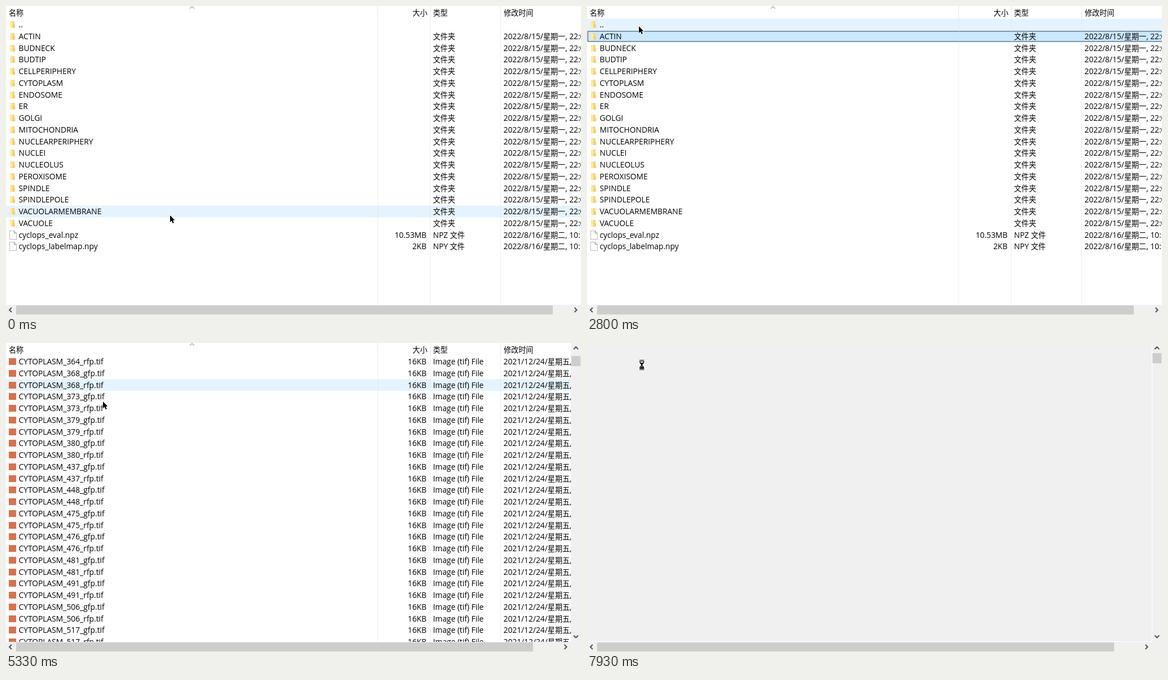
Recreate the animation shown at these times as an HTML page with a canvas. Size 1020 px wide and 549 px high, loop 8 s.

```html
<!DOCTYPE html>
<html lang="zh">
<head>
<meta charset="utf-8">
<title>File list</title>
<style>
html, body { margin: 0; width: 100%; height: 100%; overflow: hidden; background: #fff; }
canvas { display: block; width: 1020px; height: 549px; }
</style>
</head>
<body>
<canvas id="stage"></canvas>
<script>
const W = 1020, H = 549, LOOP = 8000, FPS = 15;
const TOP = 22.75, ROW = 20.75, BOTTOM = 531, LIST_RIGHT = 1002;
const LATIN = '13.8px "Open Sans", "Noto Sans", sans-serif';
const CJK = '13.1px "Noto Sans CJK SC", "Noto Sans CJK", sans-serif';

const canvas = document.getElementById('stage');
const ctx = canvas.getContext('2d');
const dpr = window.devicePixelRatio || 1;
canvas.width = W * dpr;
canvas.height = H * dpr;

// Folder contents
const up = { icon: folderIcon, name: '..' };
const folders = ('ACTIN BUDNECK BUDTIP CELLPERIPHERY CYTOPLASM ENDOSOME ER GOLGI MITOCHONDRIA ' +
  'NUCLEARPERIPHERY NUCLEI NUCLEOLUS PEROXISOME SPINDLE SPINDLEPOLE VACUOLARMEMBRANE VACUOLE')
  .split(' ')
  .map(name => ({ icon: folderIcon, name, type: '文件夹', date: '2022/8/15/星期一, 22:07' }));

function dataFile(name, size, type) {
  return { icon: pageIcon, name, size, type, date: '2022/8/16/星期二, 10:13' };
}

function images(name, ids) {
  return [up, ...ids.flatMap(id => ['gfp', 'rfp'].map(dye => ({
    icon: imageIcon, name: `${name}_${id}_${dye}.tif`, size: '16KB',
    type: 'Image (tif) File', date: '2021/12/24/星期五, 11:20'
  })))];
}

const root = [
  up, ...folders,
  dataFile('cyclops_eval.npz', '10.53MB', 'NPZ 文件'),
  dataFile('cyclops_labelmap.npy', '2KB', 'NPY 文件')
];
const actin = images('ACTIN', '70 122 137 173 196 201 205 259 278 290 414 422'.split(' '));
const cytoplasm = images('CYTOPLASM', [
  ...'39 42 50 81 93 96 99 100 110 124 161 162'.split(' '),
  ...Array.from({ length: 11 }, (_, i) => 178 + 17 * i),
  ...'364 368 373 379 380 437 448 475 476 481 491 506 517'.split(' ')
]);

// What is open, selected or loading, each from a given tick on.
const scenes = [
  { from: 0, list: root },
  { from: 23, list: root, select: 'ACTIN' },
  { from: 25, list: actin },
  { from: 37, list: actin, select: '..' },
  { from: 41, list: root, select: 'ACTIN' },
  { from: 53, list: root, select: 'CYTOPLASM' },
  { from: 56, list: root, select: 'CYTOPLASM', busy: true },
  { from: 61, busy: true },
  { from: 63, list: cytoplasm },
  { from: 98, list: cytoplasm, select: '..' },
  { from: 100, list: root, select: 'CYTOPLASM' },
  { from: 113, list: root, select: 'SPINDLEPOLE', busy: true },
  { from: 119, busy: true }
];

// Pointer moves: first tick, last tick, destination.
const origin = [291, 372];
const moves = [
  [1, 6, 240, 530], [6, 11, 232, 468], [13, 23, 76, 58],
  [24, 30, 88, 103], [30, 34, 92, 36], [44, 53, 100, 134],
  [55, 59, 126, 199], [61, 68, 146, 302], [71, 75, 160, 6],
  [77, 83, 183, 203], [88, 92, 120, 5], [94, 98, 90, 36],
  [100, 106, 86, 338], [112, 119, 97, 39]
];

function ease(tick, from, to) {
  const k = Math.min(1, Math.max(0, (tick - from) / (to - from)));
  return (1 - Math.cos(Math.PI * k)) / 2;
}

function pointer(tick) {
  let [x, y] = origin;
  for (const [from, to, tx, ty] of moves) {
    const k = ease(tick, from, to);
    x += (tx - x) * k;
    y += (ty - y) * k;
  }
  return [x, y];
}

// The wheel turns three rows per notch, sixteen notches down and back up.
function scrolled(tick) {
  return 3 * Math.round(16 * (ease(tick, 63, 68) - ease(tick, 79, 88)));
}

// Drawing helpers
function rect(color, x, y, w, h) {
  ctx.fillStyle = color;
  ctx.fillRect(x, y, w, h);
}

function line(points, color, width = 1) {
  ctx.beginPath();
  points.forEach(([x, y]) => ctx.lineTo(x, y));
  ctx.strokeStyle = color;
  ctx.lineWidth = width;
  ctx.stroke();
}

function poly(points, fill, stroke, width = 1) {
  ctx.beginPath();
  points.forEach(([x, y]) => ctx.lineTo(x, y));
  ctx.closePath();
  if (stroke) {
    ctx.strokeStyle = stroke;
    ctx.lineWidth = width;
    ctx.stroke();
  }
  ctx.fillStyle = fill;
  ctx.fill();
}

// Latin and Chinese runs differ slightly in size.
function text(str, x, y, right) {
  const runs = str.match(/[\u4e00-\u9fff]+|[^\u4e00-\u9fff]+/g).map(s => {
    const font = /[\u4e00-\u9fff]/.test(s) ? CJK : LATIN;
    ctx.font = font;
    return { s, font, w: ctx.measureText(s).width };
  });
  if (right) x -= runs.reduce((sum, r) => sum + r.w, 0);
  ctx.fillStyle = '#000';
  for (const r of runs) {
    ctx.font = r.font;
    ctx.fillText(r.s, x, y);
    x += r.w;
  }
}

function folderIcon(y) {
  rect('#f8d775', 7, y - 6, 8, 12);
  rect('#ffe9a6', 7, y - 6, 4, 12);
  rect('#f6d06c', 12, y, 4, 6);
}

function pageIcon(y) {
  poly([[6.5, y - 7.5], [14.5, y - 7.5], [18.5, y - 3.5], [18.5, y + 7.5], [6.5, y + 7.5]], '#fdfdfd', '#777');
  line([[14.5, y - 7.5], [14.5, y - 3.5], [18.5, y - 3.5]], '#888');
}

function imageIcon(y) {
  rect('#d9714a', 5, y - 6, 13, 12);
}

function chevron(x, y, turns) {
  ctx.save();
  ctx.translate(x, y);
  ctx.rotate(turns * Math.PI / 2);
  line([[-4, 2], [0, -2], [4, 2]], '#505050', 2);
  ctx.restore();
}

function arrow(x, y) {
  const shape = [[0, 0], [0, 12], [2.8, 9.4], [4.8, 14], [6.9, 13.1], [4.9, 8.7], [8.4, 8.5]];
  poly(shape.map(([a, b]) => [x + a, y + b]), '#000', '#fff', 1.6);
}

function hourglass(x, y) {
  rect('#fff', x - 4.5, y - 9.5, 9.5, 19);
  for (const side of [-1, 1]) {
    const at = (dx, dy) => [x + 0.25 + dx, y + side * dy];
    line([at(-3.2, 7), at(-3.2, 4), at(0, 0), at(3.2, 4), at(3.2, 7)], '#000', 1.4);
    line([at(-4.2, 6.5), at(4.2, 6.5)], '#000');
    line([at(-4.2, 8.5), at(4.2, 8.5)], '#000');
  }
  poly([[x - 2.5, y - 4], [x + 3, y - 4], [x + 0.25, y]], '#000');
  poly([[x - 2.5, y + 6], [x + 3, y + 6], [x + 0.25, y + 2]], '#000');
}

// Window parts
function header(hot) {
  if (hot) rect('#d9ebf9', 0, 0, 659, 22);
  line([[326, 4.5], [330, 1], [334, 4.5]], '#777');
  text('名称', 5, 17);
  text('大小', 747.5, 17, true);
  text('类型', 757.5, 17);
  text('修改时间', 883, 17);
}

function rows(list, first, select, hover, right) {
  const shown = list.slice(first, first + 25);
  shown.forEach((item, i) => {
    const top = TOP + i * ROW;
    const selected = item.name === select;
    if (selected) rect('#cce8ff', 1, top, right, ROW);
    else if (i === hover) rect('#e5f3ff', 0, top, right, ROW);
    if (selected || (item === up && list !== root)) {
      ctx.strokeStyle = selected ? '#34495a' : '#333';
      ctx.lineWidth = 1;
      ctx.strokeRect(1.5, Math.round(top) + 1, list === root ? W : right - 2, 18);
    }
    const base = Math.round(top + 15.25);
    item.icon(base - 5);
    text(item.name, 22.5, base);
    if (item.size) text(item.size, 746, base, true);
    if (item.type) text(item.type, 757.5, base);
    if (item.date) text(item.date, 882.5, base);
  });
}

function scrollbars(wide, first) {
  rect('#f0f0f0', 0, BOTTOM, W, H - BOTTOM);
  rect('#cdcdcd', 18, 532, wide ? 952 : 917, 16);
  chevron(8, 540, -1);
  chevron(wide ? 1010.5 : 992.5, 540, 1);
  if (wide) return;
  rect('#f0f0f0', LIST_RIGHT, 0, W - LIST_RIGHT, BOTTOM);
  rect('#cdcdcd', 1003, 18 + Math.round(first / 10), 16, 18);
  chevron(1011, 9, 0);
  chevron(1011, 521.5, 2);
}

function draw(tick) {
  const { list, select, busy } = scenes.filter(s => s.from <= tick).pop();
  const first = list === cytoplasm ? scrolled(tick) : 0;
  const wide = list === root;
  const right = wide ? W : LIST_RIGHT;
  const [x, y] = pointer(tick).map(Math.round);

  ctx.setTransform(dpr, 0, 0, dpr, 0, 0);
  rect(list ? '#fff' : '#f0f0f0', 0, 0, W, H);
  if (list) {
    // The hover mark trails the pointer and rests while scrolling.
    const markY = pointer(tick - 0.5)[1];
    const still = scrolled(tick) === scrolled(tick - 1);
    const hover = still && markY < BOTTOM ? Math.floor((markY - TOP) / ROW) : NaN;
    ctx.save();
    ctx.beginPath();
    ctx.rect(0, 0, right, BOTTOM);
    ctx.clip();
    header(hover < 0);
    rows(list, first, select, hover, right);
    for (const column of [659, 752, 877]) {
      rect('#e2e8ee', column, 0, 1, 22);
      rect('rgba(200, 225, 245, .45)', column, 22, 1, BOTTOM);
    }
    ctx.restore();
  }
  scrollbars(wide, first);
  if (!list) {
    rect('#fff', LIST_RIGHT, 0, 1, BOTTOM);
    rect('#fff', 0, BOTTOM - 1, LIST_RIGHT, 1);
  }
  (busy ? hourglass : arrow)(x, y);
}

let shown = -1;
const start = performance.now();
function play() {
  const time = (performance.now() - start) % LOOP;
  // A few milliseconds of slack keep rounded times on the right tick.
  const tick = Math.floor((time + 4) * FPS / 1000) % (LOOP * FPS / 1000);
  if (tick !== shown) draw(shown = tick);
  requestAnimationFrame(play);
}
play();
</script>
</body>
</html>
```
